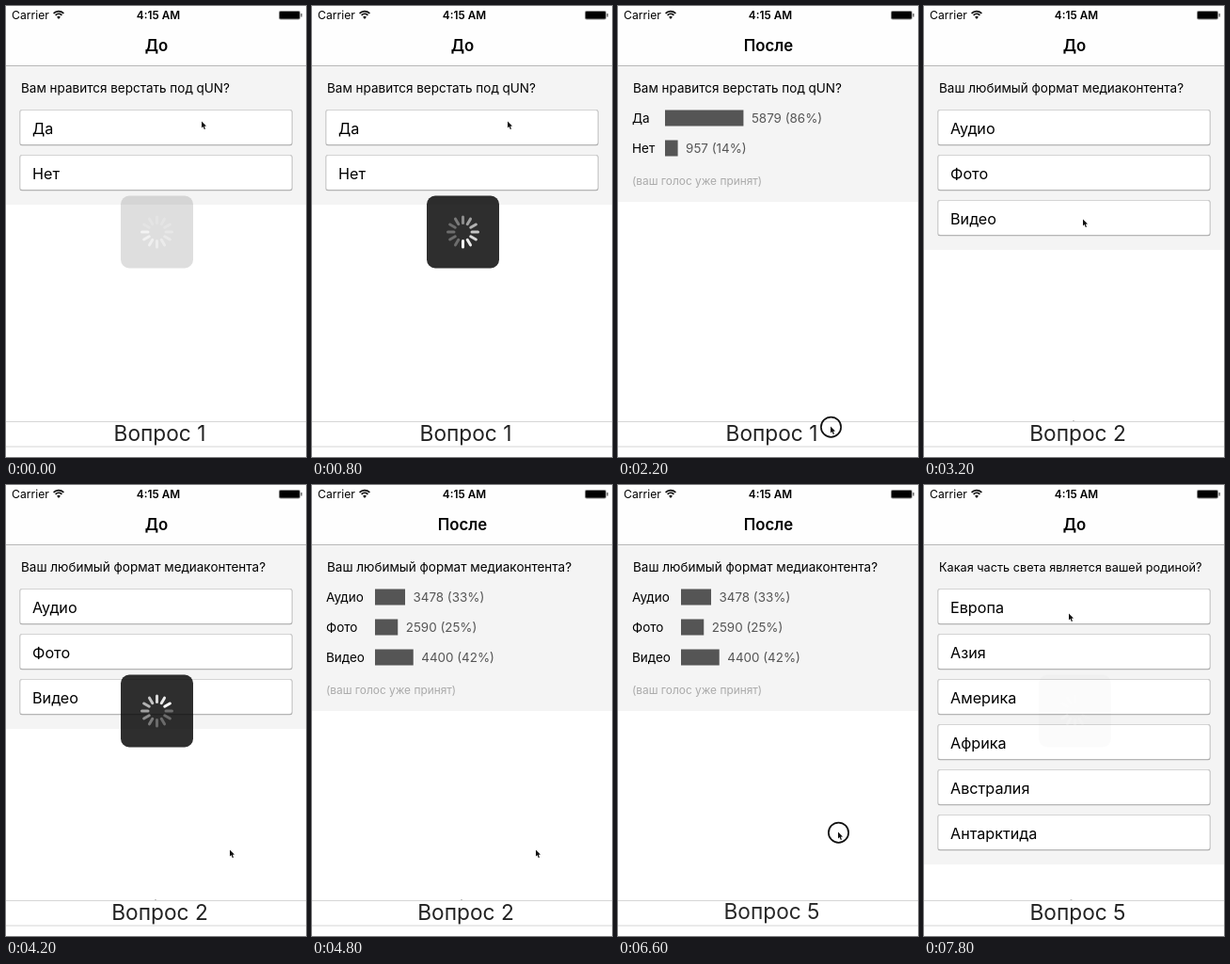
An HTML page with a canvas for the animation above (8 s loop, 319 by 479 pixels).

```html
<!DOCTYPE html>
<html lang="ru">
<head>
<meta charset="utf-8">
<style>
  html, body { margin: 0; width: 100%; height: 100%; overflow: hidden; background: #fff; }
  canvas { display: block; width: 100%; height: 100%; }
</style>
</head>
<body>
<canvas id="stage"></canvas>
<script>
const W = 319, H = 479, LOOP = 8000, STEP = 200;
const canvas = document.getElementById('stage');
const ctx = canvas.getContext('2d');
const density = window.devicePixelRatio || 1;
canvas.width = W * density;
canvas.height = H * density;

const surveys = [
  { title: 'Вам нравится верстать под qUN?', size: 13.5, barX: 50,
    answers: [['Да', 5879, 86], ['Нет', 957, 14]] },
  { title: 'Ваш любимый формат медиаконтента?', size: 13.5, barX: 67,
    answers: [['Аудио', 3478, 33], ['Фото', 2590, 25], ['Видео', 4400, 42]] },
  { title: 'Какая часть света является вашей родиной?', size: 12.7,
    answers: ['Европа', 'Азия', 'Америка', 'Африка', 'Австралия', 'Антарктида'].map(name => [name]) }
];

// Each scene: start, survey index, time at which the results slide in
const scenes = [
  { start: 0, survey: 0, results: 1220 },
  { start: 2800, survey: 1, results: 4500 },
  { start: 7000, survey: 2, results: Infinity }
];

// Loading panels: fade in from, fade out from, leading spoke at the start
const loaders = [
  { from: -40, to: 1260, spoke: 9 },
  { from: 3700, to: 4560, spoke: 8 },
  { from: 7795, to: Infinity, spoke: 0 }
];

const pointerPath = [
  [0, 208, 122], [1400, 208, 122], [2000, 226, 446], [2200, 226, 446], [2600, 224, 412],
  [3200, 169, 226], [3600, 169, 226], [4000, 238, 387], [5000, 238, 387], [5200, 238, 455],
  [5800, 238, 408], [6600, 234, 368], [7200, 232, 363], [7800, 154, 136]
];
const pickerPath = [[0, 1], [2200, 1], [2600, 2], [5200, 2], [5800, 3.38], [6600, 5.06], [6800, 5]];
const presses = [[2200, 2600], [5200, 6700]];

const clamp = v => Math.max(0, Math.min(1, v));

function along(path, t) {
  const next = path.findIndex(key => key[0] > t);
  if (next < 0) return path[path.length - 1].slice(1);
  const a = path[next - 1], b = path[next];
  const p = (t - a[0]) / (b[0] - a[0]);
  return a.slice(1).map((v, i) => v + (b[i + 1] - v) * p);
}

function rect(x, y, w, h, color) {
  ctx.fillStyle = color;
  ctx.fillRect(x, y, w, h);
}

function rounded(x, y, w, h, r, color) {
  ctx.fillStyle = color;
  ctx.beginPath();
  ctx.roundRect(x, y, w, h, r);
  ctx.fill();
}

function text(str, x, y, size, { color = '#000', weight = 400, align = 'left' } = {}) {
  ctx.font = `${weight} ${size}px Inter, sans-serif`;
  ctx.textAlign = align;
  ctx.fillStyle = color;
  ctx.fillText(str, x, y);
}

function withAlpha(alpha, draw) {
  ctx.save();
  ctx.globalAlpha = alpha;
  draw();
  ctx.restore();
}

function drawHeader(fade) {
  rect(0, 0, W, 63, '#fefefe');
  rect(0, 63, W, 1, '#b8b8b8');
  text('Carrier', 6, 14, 12.2);
  text('4:15 AM', 162, 14, 11.8, { weight: 600, align: 'center' });

  ctx.strokeStyle = '#111';
  ctx.lineWidth = 1.7;
  for (const r of [4.6, 7.4]) {
    ctx.beginPath();
    ctx.arc(56, 13, r, -Math.PI * 0.76, -Math.PI * 0.24);
    ctx.stroke();
  }
  ctx.fillStyle = '#111';
  ctx.beginPath();
  ctx.moveTo(56, 14);
  ctx.arc(56, 13.5, 2.6, -Math.PI * 0.76, -Math.PI * 0.24);
  ctx.fill();

  rounded(290, 5, 23, 9.5, 2, '#888');
  rounded(291, 6, 21, 7.5, 1, '#000');
  rect(313.5, 8, 1.3, 3.5, '#555');

  const title = { weight: 600, align: 'center' };
  withAlpha(1 - fade, () => text('До', 160, 47.6, 16.8, title));
  withAlpha(fade, () => text('После', 160, 47.6, 16.8, title));
}

function drawForm({ answers }) {
  rect(0, 64, W, answers.length * 48 + 51, '#f4f4f4');
  answers.forEach(([name], i) => {
    const y = 110 + i * 48;
    rounded(14.5, y, 290, 38.3, 2.5, '#aaa');
    rounded(14.5, y, 289.5, 37.2, 2.5, '#d4d4d4');
    rounded(15.5, y + 1, 288, 36, 2, '#fff');
    text(name, 28, y + 26, 16.2);
  });
}

function drawResults({ answers, barX }, progress) {
  const noteY = 119 + answers.length * 32 + 2;
  const place = y => 64 + (y - 64) * progress;
  ctx.save();
  if (progress < 1) {
    rect(0, 64, W, 61, '#f4f4f4');
    ctx.beginPath();
    ctx.rect(0, 125, W, H);
    ctx.clip();
  }
  rect(0, 64, W * progress, (noteY + 23 - 64) * progress, '#f4f4f4');
  answers.forEach(([name, votes, percent], i) => {
    const y = place(119 + i * 32), x = barX * progress;
    const width = percent * 0.97 * progress;
    text(name, 15 * progress, y + 5, 13.5);
    rect(x, y - 8.5, width, 17 * progress, '#555');
    text(`${votes} (${percent}%)`, x + width + 8.5, y + 5, 13.4, { color: '#555' });
  });
  text('(ваш голос уже принят)', 15 * progress, place(noteY) + 4.5, 11.9, { color: '#aaa' });
  ctx.restore();
}

function drawPicker(position) {
  rect(0, 441, W, 1, '#d6d6d6');
  rect(0, 467.5, W, 1, '#d6d6d6');
  ctx.save();
  ctx.beginPath();
  ctx.rect(0, 440, W, 28);
  ctx.clip();
  // Rows sit on a cylinder, so they flatten away from the centre
  for (let row = 1; row <= 5; row++) {
    const angle = (row - position) * 0.66;
    if (Math.abs(angle) > 1.2) continue;
    ctx.save();
    ctx.translate(163.5, 454 + 38 * Math.sin(angle));
    ctx.scale(1, Math.cos(angle));
    ctx.globalAlpha = 1 - 0.55 * Math.abs(angle);
    text(`Вопрос ${row}`, 0, 8.3, 22.7, { color: '#222', align: 'center' });
    ctx.restore();
  }
  ctx.restore();
}

function drawLoader({ from, to, spoke }, t) {
  const alpha = Math.min(clamp((t - from) / 250), 1 - clamp((t - to) / 182));
  if (alpha <= 0) return;
  withAlpha(alpha, () => rounded(122, 201.5, 77, 77, 9, 'rgba(0,0,0,.82)'));
  const lead = Math.floor(spoke + Math.max(0, t - Math.max(0, from)) * 0.012);
  const visible = alpha ** 0.25;
  ctx.save();
  ctx.translate(160.5, 240);
  ctx.strokeStyle = '#fff';
  ctx.lineWidth = 3;
  ctx.lineCap = 'round';
  for (let i = 0; i < 12; i++) {
    const age = (lead - i + 120) % 12;
    ctx.globalAlpha = visible * Math.max(0.3, 1 - age * 0.09);
    ctx.save();
    ctx.rotate(i * Math.PI / 6);
    ctx.beginPath();
    ctx.moveTo(0, -9.5);
    ctx.lineTo(0, -16);
    ctx.stroke();
    ctx.restore();
  }
  ctx.restore();
}

function drawPointer(x, y, pressed) {
  if (pressed) {
    ctx.strokeStyle = '#111';
    ctx.lineWidth = 1.7;
    ctx.beginPath();
    ctx.arc(x + 0.5, y + 1.2, 10.6, 0, Math.PI * 2);
    ctx.stroke();
  }
  ctx.save();
  ctx.translate(x, y + 0.5);
  ctx.beginPath();
  [[0, 0], [0, 7], [1.6, 5.6], [2.8, 8.4], [4, 7.9], [2.9, 5.2], [5, 5.1]]
    .forEach(p => ctx.lineTo(...p));
  ctx.closePath();
  ctx.lineWidth = 1;
  ctx.strokeStyle = '#fff';
  ctx.stroke();
  ctx.fillStyle = '#111';
  ctx.fill();
  ctx.restore();
}

function draw(t) {
  ctx.setTransform(density, 0, 0, density, 0, 0);
  rect(0, 0, W, H, '#fff');
  const scene = scenes.filter(s => s.start <= t).pop();
  const survey = surveys[scene.survey];
  const fade = clamp((t - scene.results) / 287);
  const progress = 1 - (1 - fade) ** 2;

  drawHeader(fade);
  if (progress > 0) drawResults(survey, progress);
  else drawForm(survey);
  text(survey.title, 16, 91.7, survey.size);
  drawPicker(along(pickerPath, t)[0]);
  loaders.forEach(loader => drawLoader(loader, t));
  drawPointer(...along(pointerPath, t), presses.some(([a, b]) => t >= a && t < b));
}

function tick() {
  const t = performance.now() % LOOP;
  draw(Math.floor(t / STEP) * STEP);
  requestAnimationFrame(tick);
}
tick();
</script>
</body>
</html>
```
